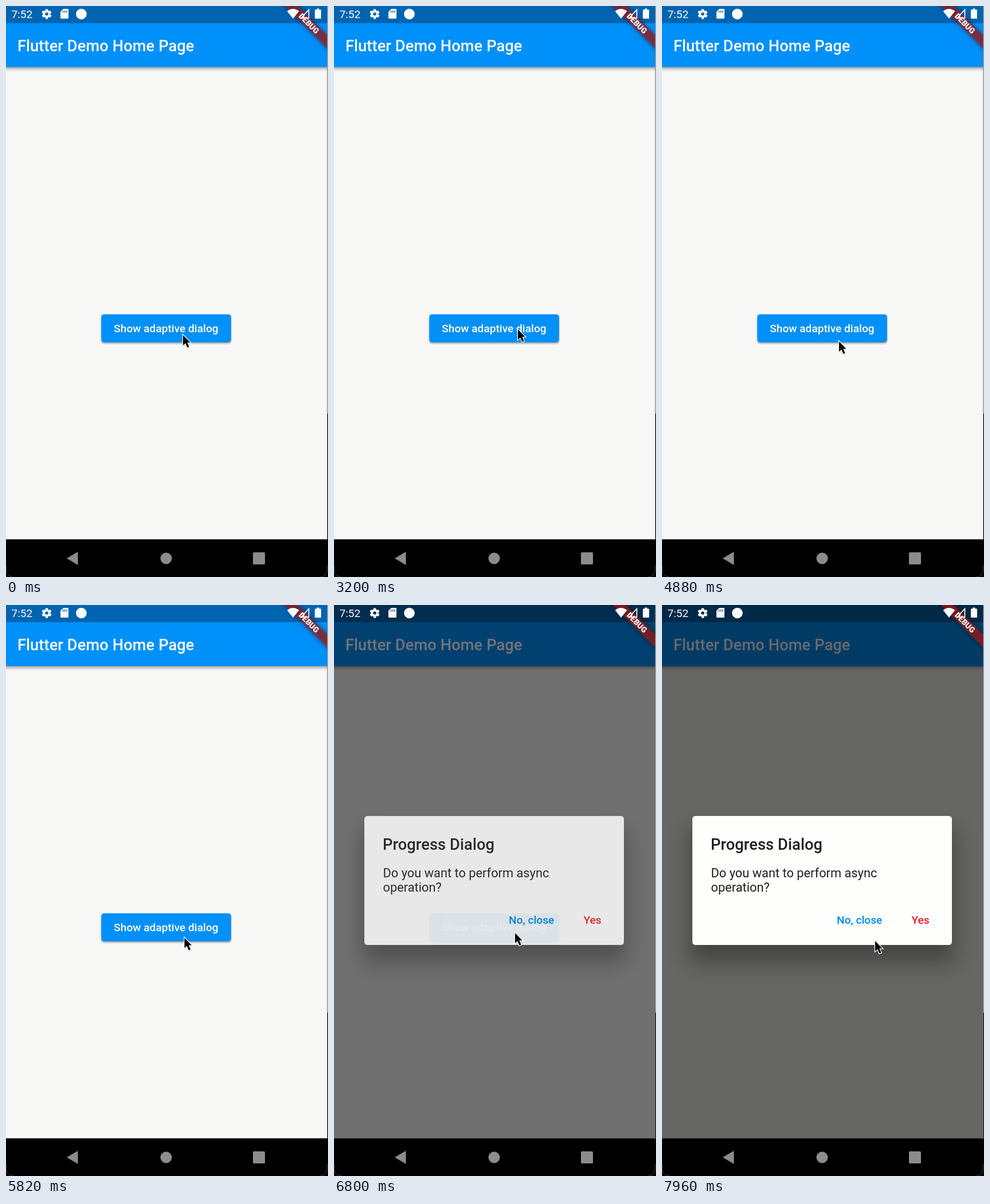
Write an HTML page that moves like this. It is 562x996 px and loops after 8000 ms.

```html
<!DOCTYPE html>
<html lang="en">
<head>
<meta charset="utf-8">
<title>Adaptive dialog</title>
<style>
  html, body { margin: 0; width: 100%; height: 100%; overflow: hidden; background: #000; }
  svg { display: block; width: 562px; height: 996px; font: 500 19.1px Roboto, sans-serif; }
  .title { font-size: 27.25px; letter-spacing: .08px; }
  .body { font-weight: 400; font-size: 21.8px; }
</style>
</head>
<body>
<svg viewBox="0 0 562 996">
  <defs>
    <clipPath id="screen"><rect width="561" height="930.5"/></clipPath>
    <clipPath id="buttonClip"><rect x="166.300" y="537.700" width="226.500" height="49" rx="5"/></clipPath>
  </defs>

  <g clip-path="url(#screen)">
    <rect width="561" height="931" fill="#f8f8f7"/>
    <rect x="-10" y="40" width="582" height="69" opacity=".42" style="filter:blur(3px)"/>
    <rect width="561" height="106.500" fill="#0090f9"/>
    <rect width="561" height="30" fill="#0064b0"/>
    <text class="title" x="20" y="78.500" fill="#fff">Flutter Demo Home Page</text>

    <rect id="buttonShadow" x="166.300" y="537.700" width="226.500" height="49" rx="5"/>
    <g clip-path="url(#buttonClip)">
      <rect x="166" y="537" width="227" height="50" fill="#0090f9"/>
      <rect id="highlight" x="166" y="537" width="227" height="50" fill="#fff"/>
      <circle id="ripple" fill="#fff"/>
    </g>
    <text x="279.500" y="569" fill="#fff" text-anchor="middle">Show adaptive dialog</text>

    <rect id="barrier" width="561" height="931"/>

    <g id="dialog">
      <rect x="44" y="386" width="471" height="244" rx="14" opacity=".24" style="filter:blur(19px)"/>
      <rect x="61" y="390" width="437" height="218" rx="8" opacity=".12" style="filter:blur(12px)"/>
      <rect x="53" y="368" width="453" height="225" rx="5.500" fill="#fefefd"/>
      <g fill="#1f1f1f">
        <text class="title" x="85" y="426.500">Progress Dialog</text>
        <text class="body" x="85.500" y="474.500">Do you want to perform async</text>
        <text class="body" x="85.500" y="500.300">operation?</text>
      </g>
      <text x="344.700" y="556" fill="#008cee" text-anchor="middle">No, close</text>
      <text x="451" y="556" fill="#ea1c24" text-anchor="middle">Yes</text>
    </g>

    <g transform="translate(560.5) rotate(45)">
      <rect x="-60" y="36" width="120" height="16.300" opacity=".5" style="filter:blur(4px)"/>
      <rect x="-60" y="36" width="120" height="16.300" fill="#b71c1c" opacity=".63"/>
      <text x="-.8" y="48.800" fill="#fff" text-anchor="middle" style="font-size:13.6px;font-weight:900">DEBUG</text>
    </g>
  </g>

  <g fill="#fff">
    <text x="9.500" y="21" style="font-weight:400">7:52</text>
    <g fill="none" stroke="#fff">
      <circle cx="71" cy="14" r="4.800" stroke-width="4"/>
      <circle cx="71" cy="14" r="7.300" stroke-width="2.800" pathLength="12" stroke-dasharray="1.1 .9" stroke-dashoffset="-.45"/>
    </g>
    <path d="M100 5H107.5Q109 5 109 6.5V20.5Q109 22 107.5 22H96.5Q95 22 95 20.5V10Z"/>
    <path d="M99.5 8v3.5M102.5 8v3.5M105.5 8v3.5" stroke="#0064b0" stroke-width="1.500"/>
    <circle cx="131.500" cy="14" r="9.300"/>
    <path d="M490.5 9Q501 1 511.5 9L501 22Z"/>
    <path d="M528.5 6.5V21H515.5Z" fill="none" stroke="#fff" stroke-width="1.700"/>
    <path d="M542.5 4.5h4v2h2.5q1 0 1 1v13.5q0 1-1 1h-9q-1 0-1-1v-13.5q0-1 1-1h2.5z"/>
  </g>

  <rect y="930.500" width="562" height="65.500"/>
  <path d="M.5 975V984Q1 995.5 13 995.5M548 995.5Q560 995.5 560.5 984V975" fill="none" stroke="#3c3c40"/>
  <g fill="#8c8c8c">
    <path d="M106 963.5L125.500 952V975Z"/>
    <circle cx="279.500" cy="963.500" r="10"/>
    <rect x="431" y="953" width="21" height="21" rx="1.500"/>
  </g>
  <rect x="560" width="1" height="931" fill="#777" opacity=".6"/>
  <rect x="561" width="1" height="711" fill="#b0b0b0"/>
  <rect x="561" y="711" width="1" height="285"/>

  <g id="cursor">
    <g transform="scale(.9)">
      <path d="M0 0V20L4.6 15.8L8.3 24.3L11.8 22.8L8.2 14.5H14Z" transform="translate(.5 2)" opacity=".3" style="filter:blur(1.5px)"/>
      <path d="M0 0V20L4.6 15.8L8.3 24.3L11.8 22.8L8.2 14.5H14Z" stroke="#fff" stroke-width="2.600" paint-order="stroke"/>
    </g>
  </g>
</svg>

<script>
const LOOP = 8000, PRESS = 6560, RELEASE = 6700;
const byId = id => document.getElementById(id);
const cursor = byId('cursor'), shadow = byId('buttonShadow'), highlight = byId('highlight');
const ripple = byId('ripple'), barrier = byId('barrier'), dialog = byId('dialog');

// Cursor tip: [time, x, y]
const path = [
  [0, 309, 574], [500, 309, 574], [1200, 321, 564], [3600, 321, 564], [4500, 309, 585],
  [5500, 309, 585], [6300, 316, 572], [7760, 316, 572], [7960, 372, 586], [LOOP, 372, 586]
];

const ramp = (t, start, duration) => Math.min(1, Math.max(0, (t - start) / duration));
const smooth = x => x * x * (3 - 2 * x);
const easeOut = (x, power) => 1 - (1 - x) ** power;
const mix = (a, b, x) => a + (b - a) * x;

function cursorAt(t) {
  const i = path.findIndex(key => key[0] > t);
  const [start, x0, y0] = path[i - 1], [end, x1, y1] = path[i];
  const p = smooth(ramp(t, start, end - start));
  return [mix(x0, x1, p), mix(y0, y1, p)];
}

function draw(now) {
  const t = now % LOOP;
  cursor.setAttribute('transform', `translate(${cursorAt(t)})`);

  const released = ramp(t, RELEASE, 200);
  const lift = smooth(ramp(t, PRESS, 120)) * (1 - released);
  shadow.style.transform = `translateY(${mix(2, 6, lift)}px)`;
  shadow.style.filter = `blur(${mix(1.8, 5, lift)}px)`;
  shadow.style.opacity = mix(.36, .38, lift);
  highlight.style.opacity = .05 * ramp(t, PRESS, 50) * (1 - released);

  const held = .1 * ramp(Math.min(t, RELEASE), PRESS, 120);
  const spread = mix(held, 1, easeOut(ramp(t, RELEASE, 225), 2.3));
  ripple.setAttribute('cx', mix(316, 279.5, spread));
  ripple.setAttribute('cy', mix(573, 562.5, spread));
  ripple.setAttribute('r', mix(35, 121, spread));
  ripple.style.opacity = .24 * ramp(t, PRESS, 75) * (1 - ramp(t, RELEASE, 375));

  const opening = ramp(t, RELEASE, 150);
  barrier.style.opacity = .59 * easeOut(opening, 2.3);
  dialog.style.opacity = easeOut(opening, 1.7);
}

function frame() {
  draw(performance.now());
  requestAnimationFrame(frame);
}
frame();
</script>
</body>
</html>
```
